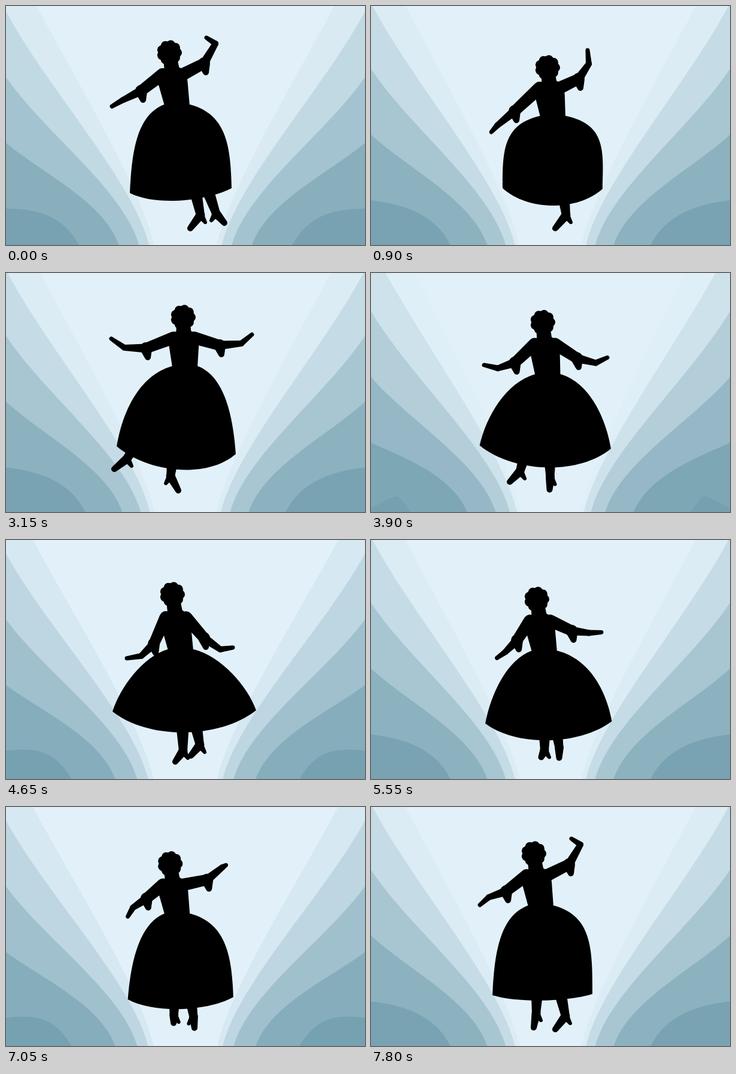
Recreate the animation shown at these times as an HTML page with a canvas. Size 600 by 400 pixels, loop 7950 ms.

```html
<!DOCTYPE html>
<html lang="en">
<head>
<meta charset="utf-8">
<title>Dancer</title>
<style>
html, body { margin: 0; width: 100%; height: 100%; overflow: hidden; background: #e2f1f9; }
canvas { display: block; width: 600px; height: 400px; }
</style>
</head>
<body>
<canvas id="stage" width="600" height="400"></canvas>
<script>
const ctx = document.getElementById('stage').getContext('2d');
const STEP = 150, STEPS = 53;
const LIGHT = [226, 241, 249], DARK = [117, 160, 176];
// Steps on which the curtain advances by two phases instead of one.
const SKIPS = [3, 10, 48];

// Blends numbers, points and nested key poses alike.
function mix(a, b, t) {
  if (typeof a === 'number') return a + (b - a) * t;
  if (Array.isArray(a)) return a.map((v, i) => mix(v, b[i], t));
  return Object.fromEntries(Object.keys(a).map(key => [key, mix(a[key], b[key], t)]));
}
const ease = t => t * t * (3 - 2 * t);
const shift = ([x, y], dx, dy) => [x + dx, y + dy];

// Arms run elbow, wrist, fingertip; feet run ankle, toe; a hem side is its corner, puff its roundness.
const opening = {
  step: 0, head: [273, 78], waist: [286, 165],
  armL: [[226, 142], [196, 157], [177, 168]],
  armR: [[331, 96], [350, 63], [335, 53]],
  hem: [[207, 313], [377, 305]], puff: [0.8, 0.9], sag: 22,
  feet: [[[325, 350], [308, 372]], [[351, 347], [365, 363]]]
};
const poses = [
  opening,
  {
    step: 6, head: [295, 103], waist: [304, 184],
    armL: [[240, 176], [211, 200], [201, 211]],
    armR: [[347, 122], [364, 97], [362, 74]],
    hem: [[220, 305], [387, 306]], puff: [1, 1.1], sag: 38,
    feet: [[[326, 350], [308, 372]], [[330, 315], [328, 318]]]
  },
  {
    step: 14, head: [298, 73], waist: [301, 157],
    armL: [[237, 93], [206, 72], [197, 54]],
    armR: [[368, 88], [391, 64], [399, 42]],
    hem: [[174, 270], [371, 309]], puff: [0.45, 0.8], sag: 49,
    feet: [[[275, 343], [289, 371]], [[190, 292], [163, 305]]]
  },
  {
    step: 21, head: [296, 74], waist: [299, 156],
    armL: [[234, 126], [198, 125], [176, 110]],
    armR: [[357, 121], [393, 118], [411, 103]],
    hem: [[185, 290], [384, 303]], puff: [0.6, 0.7], sag: 43,
    feet: [[[275, 340], [288, 364]], [[202, 311], [181, 328]]]
  },
  {
    step: 31, head: [278, 91], waist: [292, 183],
    armL: [[247, 174], [226, 194], [202, 198]],
    armR: [[331, 164], [358, 183], [379, 180]],
    hem: [[178, 287], [418, 285]], puff: [0.45, 0.45], sag: 48,
    feet: [[[324, 343], [309, 361]], [[296, 353], [283, 371]]]
  },
  {
    step: 43, head: [276, 107], waist: [288, 188],
    armL: [[241, 162], [223, 181], [219, 197]],
    armR: [[340, 140], [370, 128], [391, 129]],
    hem: [[204, 327], [387, 322]], puff: [0.6, 0.75], sag: 32,
    feet: [[[305, 351], [320, 368]], [[284, 350], [286, 356]]]
  },
  {
    ...opening,
    step: 52, head: [272, 78], waist: [284, 165],
    armL: [[226, 141], [197, 151], [182, 164]],
    hem: [[203, 315], [370, 313]], puff: [0.8, 1], sag: 13,
    feet: [opening.feet[0], [[276, 345], [272, 369]]]
  }
];

// Curtain edge on the left half: level 0 is the bright centre, higher levels near the corner.
function fillEdge(level) {
  const depth = 5 - level;
  const top = 110 * level - 211;
  const foot = 256 - 4.2 * 2 ** level;
  ctx.beginPath();
  ctx.moveTo(0, 400);
  ctx.lineTo(0, top);
  ctx.bezierCurveTo(
    80 - 5 * level, top + 54 * depth - 3.5 * depth * depth,
    foot - 26, 282 + 2.8 * level * level,
    foot, 400);
  ctx.fill();
}

function drawCurtain(step) {
  const phase = (step + SKIPS.filter(s => step >= s).length) % 8 / 8;
  ctx.fillStyle = `rgb(${LIGHT})`;
  ctx.fillRect(0, 0, 600, 400);
  for (let level = phase; 110 * level < 611; level++) {
    const shade = ease(Math.min(1, level / 5.5));
    ctx.fillStyle = `rgb(${mix(LIGHT, DARK, shade).map(Math.round)})`;
    fillEdge(level);
    ctx.save();
    ctx.translate(600, 0);
    ctx.scale(-1, 1);
    fillEdge(level);
    ctx.restore();
  }
}

function disc([x, y], r) {
  ctx.beginPath();
  ctx.arc(x, y, r, 0, Math.PI * 2);
  ctx.fill();
}

// Limb segment whose radius changes from ra at a to rb at b.
function taper(a, ra, b, rb) {
  const angle = Math.atan2(b[1] - a[1], b[0] - a[0]);
  const length = Math.hypot(b[0] - a[0], b[1] - a[1]) || 1;
  const spread = Math.acos(Math.max(-1, Math.min(1, (ra - rb) / length)));
  ctx.beginPath();
  ctx.arc(...a, ra, angle + spread, angle - spread + Math.PI * 2);
  ctx.arc(...b, rb, angle - spread, angle + spread);
  ctx.fill();
}

function drawHead(head) {
  disc(head, 19);
  for (let i = 0; i < 9; i++) {
    const angle = i * Math.PI * 2 / 9;
    disc(shift(head, Math.cos(angle) * 13.5, Math.sin(angle) * 13.5), 7.5);
  }
}

function drawTorso(head, chest, waist) {
  taper(head, 11, chest, 13);
  ctx.beginPath();
  for (const side of [-1, 1]) {
    const outline = [
      shift(chest, side * 11, -12), shift(chest, side * 23, -5),
      shift(chest, side * 25, 12), shift(waist, side * 21, 2)
    ];
    if (side > 0) outline.reverse();
    outline.forEach(p => ctx.lineTo(...p));
  }
  ctx.fill();
}

function drawArm(shoulder, [elbow, wrist, tip]) {
  taper(shoulder, 10.5, elbow, 9);
  taper(elbow, 10, shift(elbow, 3, 15), 5);
  taper(elbow, 7.5, wrist, 5);
  taper(wrist, 5, tip, 3.5);
}

function drawSkirt({ waist, hem, puff, sag }) {
  const [left, right] = hem;
  const tops = [shift(waist, -22, 0), shift(waist, 22, 0)];
  const handles = tops.map(([x, y], i) => {
    const dx = hem[i][0] - x, dy = hem[i][1] - y;
    return [
      [x + puff[i] * dx, y + 0.12 * dy],
      shift(hem[i], (puff[i] - 1) * 0.25 * dx, -(0.3 + 0.2 * puff[i]) * dy)
    ];
  });
  const quarter = (right[0] - left[0]) / 4;
  ctx.beginPath();
  ctx.moveTo(...tops[0]);
  ctx.bezierCurveTo(...handles[0][0], ...handles[0][1], ...left);
  ctx.bezierCurveTo(...shift(left, quarter, sag), ...shift(right, -quarter, sag), ...right);
  ctx.bezierCurveTo(...handles[1][1], ...handles[1][0], ...tops[1]);
  ctx.fill();
}

function drawLeg(hip, [ankle, toe]) {
  const back = Math.sign(ankle[0] - toe[0]);
  taper(mix(ankle, hip, 0.2), 10, ankle, 7);
  taper(ankle, 7.5, toe, 5);
  taper(ankle, 6, shift(ankle, back * 8, 12), 3);
}

function drawDancer(step) {
  const next = Math.max(1, poses.findIndex(pose => pose.step >= step));
  const from = poses[next - 1], to = poses[next];
  const pose = mix(from, to, ease((step - from.step) / (to.step - from.step)));
  const chest = mix(pose.head, pose.waist, 0.42);
  ctx.fillStyle = '#000';
  pose.feet.forEach(foot => drawLeg(pose.waist, foot));
  drawSkirt(pose);
  drawTorso(pose.head, chest, pose.waist);
  drawArm(shift(chest, -17, 0), pose.armL);
  drawArm(shift(chest, 17, 0), pose.armR);
  drawHead(pose.head);
}

const start = performance.now();
function tick() {
  const step = Math.floor((performance.now() - start) / STEP) % STEPS;
  drawCurtain(step);
  drawDancer(step);
  requestAnimationFrame(tick);
}
tick();
</script>
</body>
</html>
```
